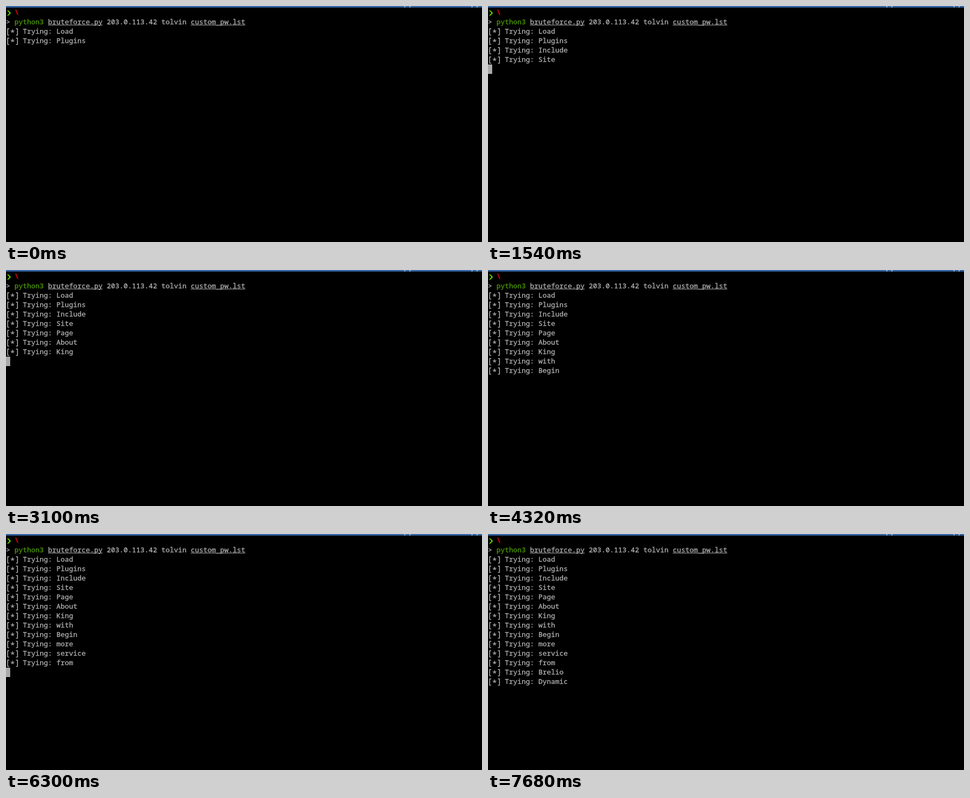
An HTML page that plays this animation: 907 by 452 pixels, repeating every 8 s.

```html
<!DOCTYPE html>
<html lang="en">
<head>
<meta charset="utf-8">
<title>Terminal</title>
<style>
  html, body { margin: 0; width: 100%; height: 100%; overflow: hidden; background: #000; }
  svg { display: block; width: 907px; height: 452px; }
  text {
    font: 13.3333px "Noto Sans Mono", "DejaVu Sans Mono", monospace;
    color: #b2b2b2;
    fill: currentColor;
    stroke: currentColor;
    stroke-width: 0.3px;
    white-space: pre;
  }
  .command { color: #4e9a06; }
  .mark, .status { font-size: 15px; }
  .status { color: #cc0000; font-weight: 700; }
</style>
</head>
<body>
<svg id="screen" viewBox="0 0 907 452" xmlns="http://www.w3.org/2000/svg">
  <rect width="907" height="452" fill="#000"/>
  <rect width="907" height="3" fill="#3465a4"/>
  <path d="M760 0V3M770.5 0L769 3M888 0V3M898.5 0L897 3" stroke="#d3d7cf" stroke-width="1.3"/>
  <path d="M2 8.5H4.5L9.5 13.5L4.5 18.5H2L6.5 13.5Z" fill="#5fd700"/>
</svg>
<script>
  const NS = "http://www.w3.org/2000/svg";
  const CELL = 8, LINE = 18, TOP = 4, BASE = 12.5;
  const LOOP = 8000, BLINK = 1710, BLINK_START = 1540;
  const FIRST_ROW = 2;

  // each word and the time it is printed
  const tries = Object.entries({
    Load: 0, Plugins: 0, Include: 980, Site: 1120, Page: 1800,
    About: 2380, King: 3100, with: 3760, Begin: 4320, more: 5160,
    service: 5620, from: 6300, Brelio: 6860, Dynamic: 7680
  });

  const screen = document.getElementById("screen");
  const rowTop = row => TOP + row * LINE;

  function add(tag, attrs, parent = screen) {
    const node = document.createElementNS(NS, tag);
    for (const key in attrs) node.setAttribute(key, attrs[key]);
    return parent.appendChild(node);
  }

  function print(col, row, string, kind = "", parent = screen) {
    const text = add("text", { x: col * CELL, y: rowTop(row) + BASE, class: kind }, parent);
    text.textContent = string;
    return text;
  }

  function printLink(col, row, string) {
    print(col, row, string);
    add("rect", {
      x: col * CELL, y: rowTop(row) + 14,
      width: string.length * CELL, height: 1, fill: "#b2b2b2"
    });
  }

  // brackets sit on the baseline, the star is lowered to their middle
  function printMark(row, parent) {
    const text = print(-1 / CELL, row, "", "mark", parent);
    add("tspan", {}, text).textContent = "[";
    add("tspan", { dy: 3.5 }, text).textContent = "*";
    add("tspan", { dy: -3.5 }, text).textContent = "]";
  }

  print(2, 0, "\\", "status");
  print(0, 1, ">");
  print(2, 1, "python3", "command");
  printLink(10, 1, "bruteforce.py");
  print(24, 1, "203.0.113.42 tolvin");
  printLink(44, 1, "custom_pw.lst");

  const lines = tries.map(([word, time], i) => {
    const group = add("g", {});
    printMark(FIRST_ROW + i, group);
    print(4, FIRST_ROW + i, "Trying: " + word, "", group);
    return { group, time };
  });

  const cursor = add("rect", { x: 0, width: CELL, height: LINE, fill: "#aaaaaa" });

  function show(node, on) {
    node.setAttribute("visibility", on ? "visible" : "hidden");
  }

  function draw(now) {
    for (const { group, time } of lines) show(group, time <= now);
    const count = lines.filter(line => line.time <= now).length;
    cursor.setAttribute("y", rowTop(FIRST_ROW + count));
    show(cursor, now >= BLINK_START && Math.floor((now - BLINK_START) / BLINK) % 2 === 0);
  }

  const start = performance.now();
  function tick() {
    draw((performance.now() - start) % LOOP);
    requestAnimationFrame(tick);
  }
  tick();
</script>
</body>
</html>
```
